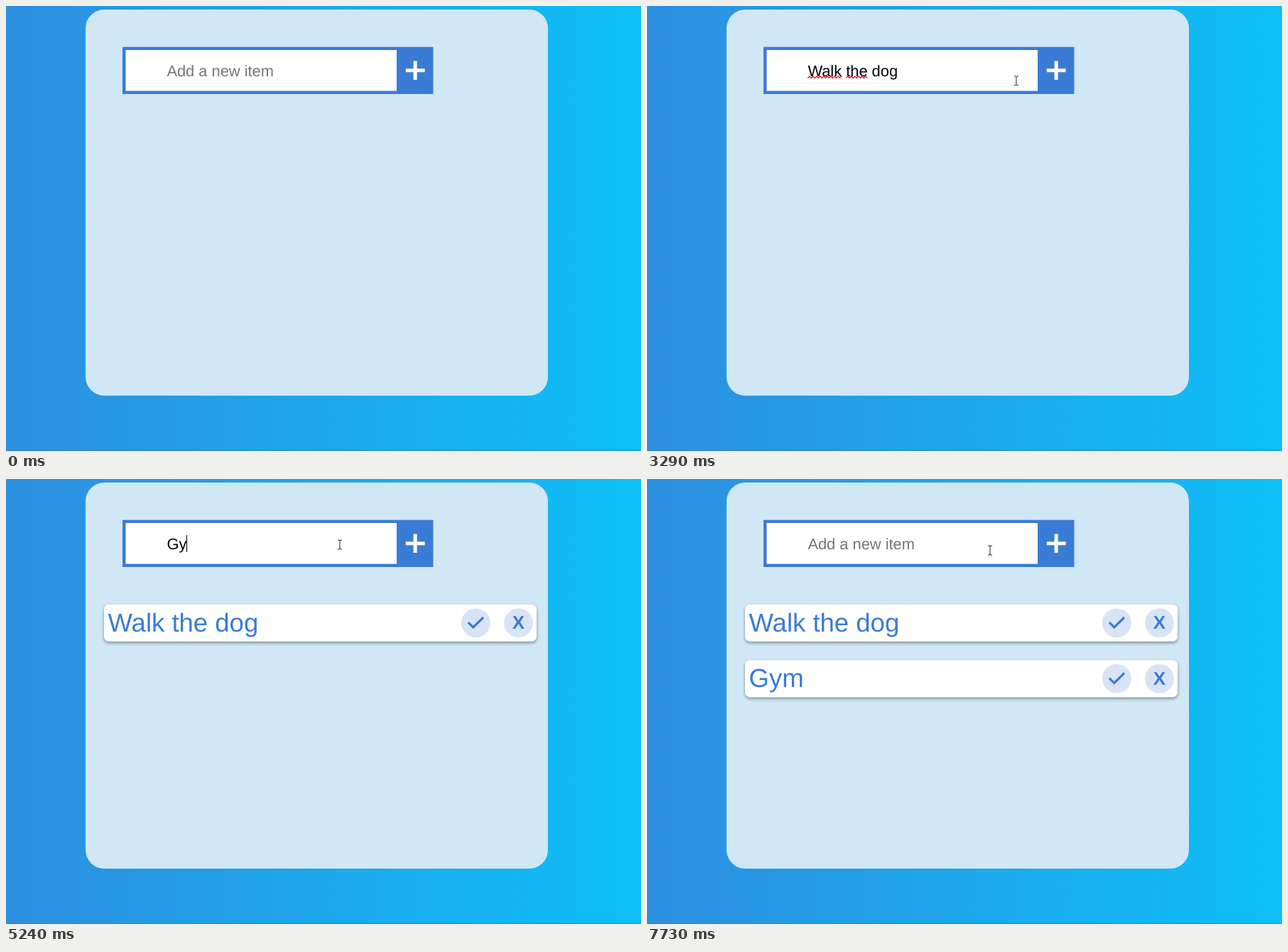
An HTML page for the animation above (8 s loop, 894x627 px).

```html
<!DOCTYPE html>
<html lang="en">
<head>
<meta charset="utf-8">
<title>To-do list</title>
<style>
  html, body { margin: 0; width: 100%; height: 100%; overflow: hidden; }
  svg { display: block; width: 894px; height: 627px; }
  text { font-family: "Liberation Sans", Arial, sans-serif; white-space: pre; text-rendering: geometricPrecision; }
  .blue { fill: #3a7bd5; }
  .field { font-size: 21.85px; }
  .card { fill: #fff; filter: drop-shadow(0 2.6px 1.95px rgba(0, 0, 0, .4)); }
  .label { font-size: 36.5px; }
  .cross { font-size: 26px; font-weight: bold; text-anchor: middle; }
  .line { fill: none; stroke-width: 1; }
</style>
</head>
<body>
<svg viewBox="0 0 894 627">
  <defs>
    <linearGradient id="sky">
      <stop offset="0" stop-color="#2d8fe0"/>
      <stop offset="1" stop-color="#0dbff7"/>
    </linearGradient>
    <g id="buttons">
      <circle cx="661.3" cy="26" r="20.5" fill="#d8e4f6"/>
      <circle cx="721.5" cy="26" r="20.5" fill="#d8e4f6"/>
      <path d="M650.8 25.5l7 6.8 14.2-14" fill="none" stroke="#3a7bd5" stroke-width="3.2"/>
      <text class="cross blue" x="721.5" y="34.5">X</text>
    </g>
  </defs>

  <rect width="894" height="627" fill="url(#sky)"/>
  <rect y="626" width="894" height="1" fill="#3c6e96" opacity=".6"/>
  <rect x="112" y="5" width="651" height="544" rx="26.2" fill="#d0e7f5"/>

  <rect class="blue" x="164" y="57.7" width="437.5" height="66.3"/>
  <rect x="168.5" y="62" width="381.5" height="57.6" fill="#fff"/>
  <path d="M562.8 90.7h26.8M576.1 77.5v26.6" stroke="#fff" stroke-width="5"/>

  <text id="hint" class="field" x="226.4" y="99" fill="#757575">Add a new item</text>
  <text id="typed" class="field" x="226.4" y="99"></text>
  <path id="squiggles" class="line" stroke="#e0202c" style="stroke-width:1.3"/>
  <rect id="caret" y="79" width="1" height="24"/>

  <g id="items"></g>

  <g id="pointer">
    <circle id="ring" cx="-1.5" r="13" fill="#ff0" opacity=".47"/>
    <path id="ibeam" class="line" stroke="#222" d="M-3-6.5h2l1 1 1-1h2M0-6v12M-3 6.5h2l1-1 1 1h2"/>
    <path id="arrow" fill="#fff" stroke="#000" d="M.5.5v16l3.7-3.6 2.4 5.6 2.3-1-2.4-5.4h5z"/>
    <g id="hand" stroke="#222">
      <path fill="#fff" d="M-1.7 1.5q1.7-2.6 3.4 0v5q2.2-.7 2.8 1 2.2-.5 2.7 1 2.3-.3 2.5 2v4q0 2-1.7 4v1.7h-8v-1.5l-4-5q-2-2.7-1-3.6 1.2-1 3.3 1.2z"/>
      <path class="line" d="M1.7 6.5v3M4.5 7.5v2.5M7.2 8.5v2"/>
    </g>
  </g>
</svg>

<script>
const LOOP = 8000;
const LEFT = 226.4;
const $ = id => document.getElementById(id);

const entries = [
  { text: 'Walk the dog', top: 176.7, added: 3770,
    keys: [1120, 1450, 1570, 1690, 1810, 1930, 2050, 2170, 2170, 2300, 2395, 2490] },
  { text: 'Gym', top: 255.2, added: 6580, keys: [4710, 5240, 5510] }
];
const clicks = [[920, 1120], [3570, 3770], [4310, 4510], [6440, 6580], [7200, 7400]];
const caretShown = [[920, 3100], [4310, 6040], [7200, 7730]];

// The pointer advances in discrete steps, slowing toward each destination.
const START = { x: 625, y: 462, at: 190 };
const moves = [
  { at: 256, every: 66, steps: 5, x: 327.5, y: 118 },
  { at: 3164, every: 63, steps: 6, x: 584, y: 101 },
  { at: 3840, every: 70, steps: 1, x: 587.5, y: 100 },
  { at: 3970, every: 70, steps: 3, x: 470, y: 92.5 },
  { at: 6107, every: 66, steps: 5, x: 568.5, y: 100 },
  { at: 6710, every: 68, steps: 6, x: 483, y: 100.5 }
];

const within = (t, spans) => spans.some(([from, to]) => t >= from && t < to);
const show = (id, on) => $(id).setAttribute('visibility', on ? 'visible' : 'hidden');

for (const entry of entries) {
  $('items').insertAdjacentHTML('beforeend', `
    <g transform="translate(0 ${entry.top})">
      <rect class="card" x="138" width="609" height="52.4" rx="7"/>
      <text class="label blue" x="143.5" y="38.2">${entry.text}</text>
      <use href="#buttons"/>
    </g>`);
  entry.node = $('items').lastElementChild;
}

function pointerAt(t) {
  let { x, y } = START;
  for (const m of moves) {
    if (t < m.at) break;
    const p = Math.min(1, (Math.floor((t - m.at) / m.every) + 1) / m.steps);
    const eased = 1 - (1 - p) ** 2;
    x += (m.x - x) * eased;
    y += (m.y - y) * eased;
  }
  return { x, y };
}

function typedAt(t) {
  const entry = entries.find(e => t >= e.keys[0] && t < e.added);
  return entry ? entry.text.slice(0, entry.keys.filter(k => k <= t).length) : '';
}

const widthOf = count => count ? $('typed').getSubStringLength(0, count) : 0;

function squiggle(from, to) {
  let d = `M${from} 101.5`;
  for (let x = from, up = true; x + 2.5 <= to; x += 2.5, up = !up) d += `l2.5 ${up ? -2.5 : 2.5}`;
  return d;
}

function drawField(t) {
  const text = typedAt(t);
  $('typed').textContent = text;
  show('hint', !text);
  show('caret', within(t, caretShown));
  $('caret').setAttribute('x', Math.round(LEFT + widthOf(text.length) + .1) + (text ? 0 : 1));
  // Only words already followed by a space are marked.
  const marks = [...text.matchAll(/\S+(?= )/g)].map(word =>
    squiggle(LEFT + widthOf(word.index), LEFT + widthOf(word.index + word[0].length)));
  $('squiggles').setAttribute('d', marks.join(''));
}

function drawPointer(t) {
  const { x, y } = pointerAt(t);
  const inRow = y > 58 && y < 124;
  const kind = t < START.at ? '' : !inRow || x > 602 ? 'arrow' : x > 550 ? 'hand' : 'ibeam';
  for (const id of ['ibeam', 'arrow', 'hand']) show(id, id === kind);
  show('ring', within(t, clicks));
  $('pointer').setAttribute('transform', `translate(${x} ${y})`);
}

function frame() {
  const t = performance.now() % LOOP;
  drawField(t);
  for (const entry of entries) entry.node.style.display = t >= entry.added ? '' : 'none';
  drawPointer(t);
  requestAnimationFrame(frame);
}
frame();
</script>
</body>
</html>
```
